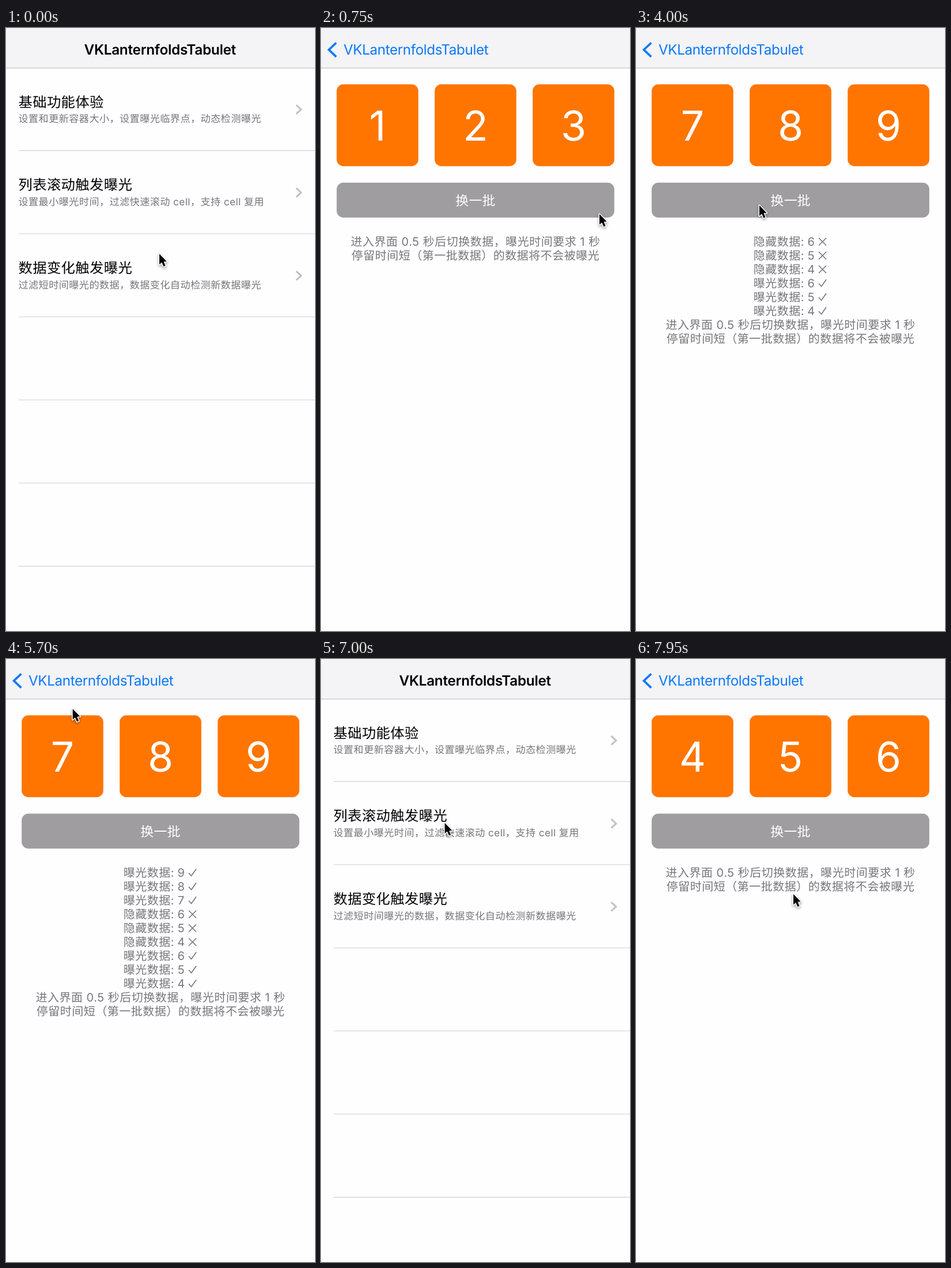
Recreate the animation shown at these times as an HTML page with a canvas. Size 536x1044 px, loop 8 s.

```html
<!DOCTYPE html>
<html lang="zh-CN">
<head>
<meta charset="utf-8">
<style>
  html, body { margin: 0; width: 536px; height: 1044px; overflow: hidden; background: #fefdff; }
  canvas { display: block; }
</style>
</head>
<body>
<canvas id="stage" width="536" height="1044"></canvas>
<script>
const ctx = document.getElementById('stage').getContext('2d');
const W = 536, H = 1044, LOOP = 8000;
const FONT = 'Inter, "Noto Sans CJK SC", "Noto Sans CJK", sans-serif';
const PAPER = '#fefdff', BLUE = '#0b79fb', GREY = '#77767a';
const APP = 'VKLanternfoldsTabulet';

const ROWS = [
  ['基础功能体验', '设置和更新容器大小，设置曝光临界点，动态检测曝光'],
  ['列表滚动触发曝光', '设置最小曝光时间，过滤快速滚动 cell，支持 cell 复用'],
  ['数据变化触发曝光', '过滤短时间曝光的数据，数据变化自动检测新数据曝光']
];
const NOTE = ['进入界面 0.5 秒后切换数据，曝光时间要求 1 秒', '停留时间短（第一批数据）的数据将不会被曝光'];

// Event times in ms
const PUSH = 300, POP = 6575, PUSH_AGAIN = 7361, TOUCH = 50;
const AUTO_SWITCH = 550, EXPOSE = 1870, TAP = 3350, EXPOSE_AGAIN = 4350;
const NAV_LAG = 9;

// Pointer stops: time, x, y
const POINTER = [
  [0, 266, 391], [100, 263, 413], [320, 263, 413], [700, 483, 322],
  [2100, 483, 322], [2450, 416, 326], [3150, 214, 307], [5150, 214, 307],
  [5900, 95, 40], [6400, 91, 41], [6700, 91, 41], [7200, 281, 414],
  [7450, 280, 414], [7600, 280, 414], [7900, 273, 407]
];

const clamp = v => Math.max(0, Math.min(1, v));
const lerp = (a, b, k) => a + (b - a) * k;
// Critically damped slide that snaps home once it is within a pixel or two
const spring = ms => {
  const u = Math.max(0, ms) * 0.02;
  return u > 8 ? 1 : 1 - (1 + u) * Math.exp(-u);
};

function text(str, x, y, size, color, { weight = 400, spacing = 0, align = 'left' } = {}) {
  ctx.font = `${weight} ${size}px ${FONT}`;
  ctx.letterSpacing = spacing + 'px';
  ctx.textAlign = align;
  ctx.fillStyle = color;
  ctx.fillText(str, x, y);
}

function rect(x, y, w, h, color, radius = 0) {
  ctx.fillStyle = color;
  ctx.beginPath();
  ctx.roundRect(x, y, w, h, radius);
  ctx.fill();
}

function line(points, color, width) {
  ctx.strokeStyle = color;
  ctx.lineWidth = width;
  ctx.beginPath();
  points.forEach(([x, y]) => ctx.lineTo(x, y));
  ctx.stroke();
}

function at(x, y, draw, alpha = 1, scale = 1) {
  ctx.save();
  ctx.translate(x, y);
  ctx.scale(scale, scale);
  ctx.globalAlpha = clamp(alpha);
  draw();
  ctx.restore();
}

function drawList(highlight) {
  rect(0, 70, W, H, PAPER);
  at(0, 0, () => rect(0, 356.5, W, 144, '#c7c6cc'), highlight);
  for (let i = 0; i < 6; i++) rect(22, 211.6 + i * 143.9, W - 22, 1.3, '#dad9de');
  ROWS.forEach(([title, detail], i) => at(0, i * 143.9, () => {
    text(title, 21.5, 136.5, 24.3, '#000', { spacing: 0.4 });
    text(detail, 21.5, 163, 17.14, GREY, { spacing: 0.43 });
    line([[503.5, 133.3], [511.8, 141], [503.5, 148.7]], '#c1c0c4', 3);
  }));
}

function drawLogLine(shown, digit, y) {
  text(shown ? '曝光数据:' : '隐藏数据:', 203.8, y + 7.6, 20, GREY, { spacing: 0.5 });
  text(digit, 303.7, y + 7.2, 20, GREY, { align: 'center' });
  if (shown) {
    line([[317, y + 1], [321.5, y + 6], [330, y - 6]], GREY, 1.7);
  } else {
    line([[317, y - 6], [330, y + 7]], GREY, 1.6);
    line([[330, y - 6], [317, y + 7]], GREY, 1.6);
  }
}

function drawPage(first, log) {
  rect(0, 70, W, H, PAPER);
  for (let i = 0; i < 3; i++) {
    const x = 27.2 + i * 170;
    rect(x, 97.6, 141.6, 141.6, '#ff7500', 11.5);
    text(first + i, x + 70.8, 194.5, 71.4, '#fff', { align: 'center' });
  }
  rect(27.2, 267.8, 481.6, 60.4, '#9f9da0', 11.5);
  text('换一批', 268, 306.7, 22.86, '#fff', { align: 'center', spacing: 0.3 });
  log.forEach(([shown, digit], i) => drawLogLine(shown, digit, 369.5 + i * 24));
  NOTE.forEach((str, i) =>
    text(str, 268, 377.1 + (log.length + i) * 24, 20, GREY, { align: 'center', spacing: 0.5 }));
}

// k: 0 = page bar, 1 = list bar
function drawNav(k, titleAlpha, backAlpha) {
  rect(0, 0, W, 69, '#f4f3f5');
  rect(0, 68.8, W, 1.3, '#c4c3c6');
  at(0, 0, () => line([[26.4, 25.6], [13.6, 37.7], [26.4, 49.8]], BLUE, 3.7), backAlpha);
  at(lerp(39, 130.5, k), 46, () => text(APP, 0, 0, 24.3, BLUE, { spacing: -0.42 }),
    backAlpha, lerp(1, 1.045, k));
  at(lerp(44, 135.5, k), 46, () => text(APP, 0, 0, 24.3, '#000', { weight: 600, spacing: -0.27 }),
    titleAlpha, lerp(0.955, 1, k));
}

function drawPointer(t) {
  const i = POINTER.findIndex(stop => stop[0] > t);
  const b = POINTER.at(i), a = i < 0 ? b : POINTER[i - 1];
  const s = a === b ? 0 : (t - a[0]) / (b[0] - a[0]);
  const k = s * s * (3 - 2 * s);
  const arrow = new Path2D('M0 0V18.5L4.2 14.8L7.4 22L10.6 20.6L7.5 13.6L12.8 13.2Z');
  at(lerp(a[1], b[1], k), lerp(a[2], b[2], k), () => {
    ctx.lineJoin = 'round';
    ctx.shadowColor = 'rgba(0,0,0,.4)';
    ctx.shadowBlur = 4;
    ctx.shadowOffsetY = 2;
    ctx.strokeStyle = '#fff';
    ctx.lineWidth = 3;
    ctx.stroke(arrow);
    ctx.shadowColor = 'transparent';
    ctx.fillStyle = '#000';
    ctx.fill(arrow);
  });
}

function render(t) {
  const popping = t >= POP && t < PUSH_AGAIN;
  const again = t >= PUSH_AGAIN;
  const start = popping ? POP : again ? PUSH_AGAIN : PUSH;
  const moved = spring(t - start), navMoved = spring(t - start - NAV_LAG);
  const open = popping ? 1 - moved : moved;

  let highlight = t >= start - TOUCH ? 1 : 0;
  if (popping) highlight = t >= PUSH_AGAIN - TOUCH ? 1 : 1 - 1.1 * moved;

  let first = t - start < AUTO_SWITCH ? 1 : 4;
  const log = [];
  const report = (shown, top) => log.unshift([shown, top], [shown, top - 1], [shown, top - 2]);
  if (!again) {
    if (t >= EXPOSE) report(true, 6);
    if (t >= TAP) { first = 7; report(false, 6); }
    if (t >= EXPOSE_AGAIN) report(true, 9);
  }

  ctx.clearRect(0, 0, W, H);
  at(-0.3 * W * open, 0, () => drawList(highlight));
  rect(0, 70, W, H, `rgba(20,10,35,${0.135 * open})`);
  at(W * (1 - open), 0, () => drawPage(first, log));
  if (popping) drawNav(navMoved, 1.25 * navMoved, 1 - 1.5 * navMoved);
  else drawNav(1 - navMoved, 1 - (navMoved < 0.5 ? 0.75 * navMoved : 1.25 * navMoved - 0.25), 1.2 * navMoved);
  drawPointer(t);
}

ctx.textRendering = 'geometricPrecision';
const began = performance.now();
function tick() {
  render((performance.now() - began) % LOOP);
  requestAnimationFrame(tick);
}
tick();
</script>
</body>
</html>
```
